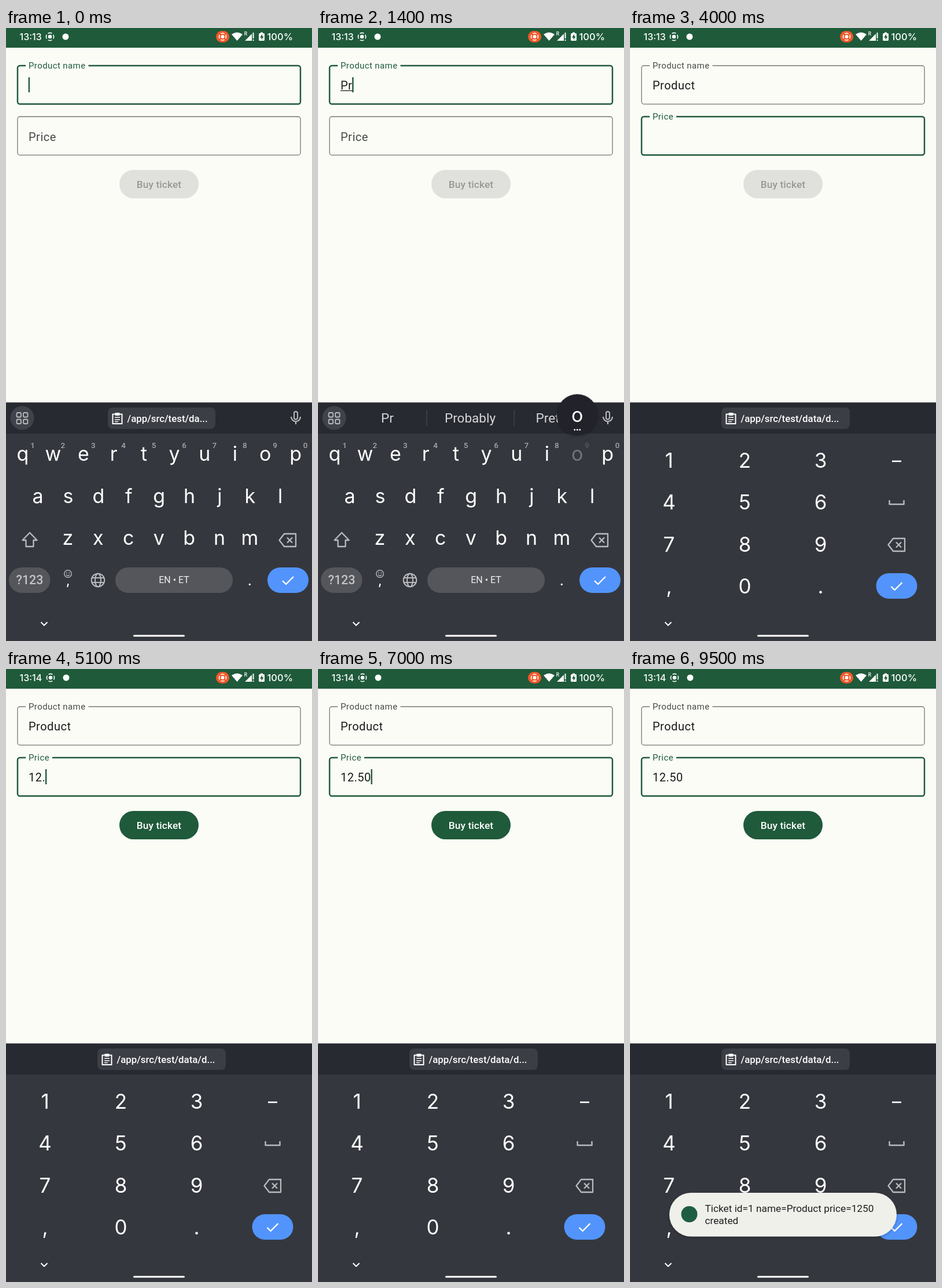
Recreate the animation shown at these times as an HTML page. Size 529 px wide and 1058 px high, loop 10000 ms.

```html
<!DOCTYPE html>
<html>
<head>
<meta charset="utf-8">
<style>
html, body { margin: 0; height: 100%; overflow: hidden; background: #fcfcf7; }
svg { display: block; width: 100vw; height: 100vh; font-family: Roboto, sans-serif; }
text { white-space: pre; }
</style>
</head>
<body>
<svg id="stage" viewBox="0 0 529 1058"></svg>
<script>
const LOOP = 10000, STEP = 100;
const GREEN = '#1f5a3b', PAPER = '#fcfcf7', PANEL = '#35373e', BAR = '#282a31';
const PILL = '#54565b', GREY = '#b9bbbf', BLUE = '#5294fb';
const KEY_FONT = 'font-family="Inter, sans-serif"';

// Timelines: [start, value] or [start, end, value]
const nameSteps = [[0, ''], [800, 'P'], [1200, 'Pr'], [1500, 'Pro'], [2300, 'Product ']];
const priceSteps = [[0, ''], [4500, '1'], [4700, '12'], [5100, '12.'], [5400, '12.5'], [6000, '12.50']];
const hintSteps = [[0, null], [800, ['P', 'Please', 'Pretty']], [1200, ['Pr', 'Probably', 'Pretty']],
  [1500, ['Pro', 'Product', 'Probably']], [2300, ['is', 'of', 'and']]];
const caretOff = [[500, 800], [2100, 2300], [2800, 3300], [4000, 4500], [5900, 6000],
  [6500, 7000], [7500, 8000], [8500, 9000], [9500, LOOP]];
const presses = [[700, 900, 'p'], [1000, 1200, 'r'], [1400, 1600, 'o'], [2100, 2300, 'hint'],
  [3300, 3500, 'enter'], [4400, 4500, '1'], [4600, 4700, '2'], [5000, 5100, '.'],
  [5200, 5400, '5'], [5900, 6000, '0']];

const within = (t, [a, b]) => t >= a && t < b;
const valueAt = (steps, t) => steps.filter(s => s[0] <= t).pop()[1];
const ramp = (t, a, b) => Math.min(1, Math.max(0, (t - a) / (b - a)));
const easeOut = p => 1 - (1 - p) ** 3;

const pen = document.createElement('canvas').getContext('2d');
const textWidth = (s, size, gap) => {
  pen.font = `${size}px Roboto, sans-serif`;
  return pen.measureText(s).width + s.length * gap;
};

const rect = (x, y, w, h, r, fill, extra = '') =>
  `<rect x="${x}" y="${y}" width="${w}" height="${h}" rx="${r}" fill="${fill}" ${extra}/>`;
const disc = (x, y, r, fill, extra = '') => `<circle cx="${x}" cy="${y}" r="${r}" fill="${fill}" ${extra}/>`;
const shape = (d, fill) => `<path d="${d}" fill="${fill}"/>`;
const line = (d, color, w = 2) =>
  `<path d="${d}" fill="none" stroke="${color}" stroke-width="${w}" stroke-linejoin="round"/>`;
const label = (x, y, s, size, fill, extra = '') =>
  `<text x="${x}" y="${y}" font-size="${size}" fill="${fill}" ${extra}>${s}</text>`;
const mid = (x, y, s, size, fill, extra = '') => label(x, y, s, size, fill, 'text-anchor="middle" ' + extra);
const at = (x, y, content) => `<g transform="translate(${x} ${y})">${content}</g>`;

function statusBar(t) {
  const late = t >= 4400, dx = late ? 1 : 0;
  const bold = KEY_FONT + ' font-weight="500"';
  const target = r => disc(0, 0, r, 'none',
    'stroke="#fff" stroke-width="1.6" pathLength="4" stroke-dasharray=".7 .3" stroke-dashoffset=".35"')
    + disc(0, 0, r / 2, '#fff');
  return rect(0, 0, 529, 34, 0, GREEN)
    + label(23.5, 20.5, late ? '13:14' : '13:13', 16, '#fff', bold)
    + at(76 + dx, 15, target(6.6))
    + disc(103 + dx, 15, 5.5, '#fff')
    + rect(363, 5, 23, 20, 10, '#f0592b')
    + at(374.5, 15, target(6))
    + shape('M390 11Q399.5 4 409 11L399.5 22Z', '#fff')
    + mid(414.5, 13, 'R', 8.5, '#fff', 'font-weight="500"')
    + shape('M413 22L425 10V22ZM426.5 8H428.5V18H426.5ZM426.5 20H428.5V22H426.5Z', '#fff')
    + rect(437, 9, 10, 13, 1.5, '#fff') + rect(440, 7.5, 4, 2, 0, '#fff')
    + shape('M443 10.5L439 16.5H441.5V20.5L445.5 14.5H443Z', GREEN)
    + label(451.5, 20.5, '100%', 16.5, '#fff', bold);
}

// lift: 0 = label rests inside the box, 1 = label sits on the border
function field(y, title, value, focused, lift, caret, composing) {
  const end = 39 + textWidth(value, 20, .5);
  let s = rect(20, y, 489, 66.3, 4, 'none',
    focused ? `stroke="${GREEN}" stroke-width="2.5"` : 'stroke="#74796f" stroke-width="1.3"');
  if (lift > 0) s += rect(34, y - 3, (textWidth(title, 15, .4) + 10) * lift, 6, 0, PAPER);
  s += label(39, y + 41.5 - 36.5 * lift, title, 20 - 5 * lift, focused ? GREEN : '#454b46',
    `letter-spacing="${.5 - .1 * lift}"`);
  s += label(39, y + 41, value, 20, '#1a1c1a', 'letter-spacing=".5"');
  if (composing) s += rect(39, y + 42.5, end - 39, 1.3, 0, '#1a1c1a');
  if (caret) s += rect(end - .3, y + 20, 2.4, 26, 0, GREEN);
  return s;
}

function form(t) {
  const onPrice = t >= 3500, caret = !caretOff.some(r => within(t, r));
  const name = valueAt(nameSteps, t), price = valueAt(priceSteps, t);
  const ripple = ramp(t, 7900, 8200), fade = 1 - ramp(t, 8200, 8500);
  let s = field(65, 'Product name', name, !onPrice, 1, caret && !onPrice, name && t < 2300)
    + field(153, 'Price', price, onPrice, easeOut(ramp(t, 3400, 3700)), caret && onPrice)
    + rect(196, 245, 137, 49, 24.5, price ? GREEN : '#e0e1dc');
  if (t >= 8000 && fade > 0)
    s += `<g clip-path="url(#button)">${disc(264, 269, 70 * ripple, '#fff', `opacity="${.16 * fade}"`)}</g>`;
  return s + mid(264.5, 276, 'Buy ticket', 17.3, price ? '#fff' : '#979994', 'font-weight="500" letter-spacing=".1"');
}

function chip(x, w, s) {
  return rect(x, 655, w, 37, 8, '#3c3e46')
    + at(x + 16.5, 674, line('M-8 -7.5H8V9H-8Z', '#fff') + rect(-4, -10, 8, 5, 1, '#fff')
      + line('M-4.5 -2H4.5M-4.5 2H4.5M-4.5 5.5H1.5', '#fff', 1.7))
    + label(x + 33.5, 679.5, s, 16.8, '#fff', 'font-weight="500"');
}

const enterKey = (x, y, pressed) => rect(x - 35.5, y - 22, 71, 44, 22, pressed ? '#86b4fc' : BLUE)
  + at(x, y, line('M-9.5 1L-3.5 7L9.5 -6', '#fff', 2.4));

const eraseKey = (x, y) => at(x, y, line('M-6 -11H14V11H-6L-14.5 0Z', GREY, 2.3)
  + line('M-1 -4.5L8 4.5M8 -4.5L-1 4.5', GREY, 2.3));

function hintBar(t, pressed) {
  let s = disc(28, 673, 20.5, '#41434a');
  for (const x of [18.5, 30]) for (const y of [664, 675.5])
    s += rect(x, y, 7.5, 7.5, 2, 'none', `stroke="${GREY}" stroke-width="1.8"`);
  const hints = valueAt(hintSteps, t);
  if (!hints) s += chip(176, 186, '/app/src/test/da...');
  else {
    if (pressed === 'hint') s += rect(190, 650, 147, 46, 8, '#3c3e46');
    s += [188, 339].map(x => rect(x - .5, 659, 1.3, 28, 0, '#44464d')).join('')
      + hints.map((h, i) => mid(120 + 143 * i, 681, h, 22.5, '#d5d6d9')).join('');
  }
  return s + at(501, 672, rect(-3, -10, 6, 13.5, 3, 'none', `stroke="${GREY}" stroke-width="2"`)
    + line('M-8 -1A8 8 0 0 0 8 -1M0 7V12', GREY, 2.2));
}

function letterKeys(t, pressed) {
  const caps = t >= 300 && t < 800;
  let s = hintBar(t, pressed), popup = '';
  [['qwertyuiop', 29, 747], ['asdfghjkl', 55, 820], ['zxcvbnm', 107, 892]].forEach(([row, x0, y], r) => {
    [...row].forEach((key, i) => {
      const x = x0 + 52.4 * i, glyph = caps ? key.toUpperCase() : key, down = key === pressed;
      const dim = down ? 'opacity=".3"' : '';
      s += mid(x, y, glyph, 34, '#fff', KEY_FONT + dim);
      if (!r) s += mid(x + 17, 725, (i + 1) % 10, 13.5, '#a5a7ab', 'font-weight="500" ' + dim);
      if (down) popup = disc(x, y - 79.5, 35.5, '#22242a', 'filter="url(#shadow)"')
        + mid(x, y - 67, glyph, 34, '#fff', KEY_FONT)
        + [-4.5, 0, 4.5].map(d => disc(x + d, y - 53.5, 1.4, '#fff')).join('');
    });
  });
  return s
    + at(41, 883, `<path d="M0 -12L12.5 1H6.5V12H-6.5V1H-12.5Z" fill="${caps ? GREY : 'none'}" stroke="${GREY}" stroke-width="2.3" stroke-linejoin="round"/>`)
    + eraseKey(487, 884)
    + rect(5, 931, 71.5, 44, 22, PILL) + mid(41, 960, '?123', 21.5, '#c2c4c7', 'font-weight="500"')
    + at(107, 942, disc(0, 0, 6.2, 'none', `stroke="${GREY}" stroke-width="1.4"`)
      + disc(-2.2, -1.6, 1, GREY) + disc(2.2, -1.6, 1, GREY) + line('M-3 1.5Q0 5 3 1.5', GREY, 1.3))
    + mid(107, 962, ',', 25, '#fff')
    + at(159, 953, disc(0, 0, 11.3, 'none', `stroke="${GREY}" stroke-width="2"`)
      + `<ellipse rx="5" ry="11.3" fill="none" stroke="${GREY}" stroke-width="2"/>` + line('M-10.5 -4H10.5M-10.5 4H10.5', GREY))
    + rect(189, 931, 203, 44, 22, PILL) + mid(290.5, 958, 'EN • ET', 16, '#f1f1f2')
    + mid(421.5, 962, '.', 30, '#fff')
    + enterKey(487.5, 953, pressed === 'enter') + popup;
}

function numberKeys(pressed) {
  let s = chip(158, 222, '/app/src/test/data/d...');
  [...'123456789,0.'].forEach((key, i) => {
    const x = 67.5 + 131 * (i % 3), y = 745.5 + 72.5 * (i / 3 | 0);
    if (key === pressed) s += rect(x - 65, y - 36, 130, 72, 36, '#54565d');
    s += mid(x, y + 13, key, 35, '#fff', KEY_FONT);
  });
  return s + rect(453, 746.5, 16, 2.6, 0, '#fff')
    + line('M448.5 815V822H473.5V815', GREY, 2.4)
    + eraseKey(461, 892) + enterKey(461, 963);
}

function toast(t) {
  const p = easeOut(ramp(t, 8300, 8800));
  if (!p) return '';
  return `<g opacity="${p}" transform="translate(264.5 942) scale(${.9 + .1 * p}) translate(-264.5 -942)">`
    + rect(68, 904, 393, 75.5, 37.7, '#f0f0eb', 'filter="url(#shadow)"')
    + disc(102.5, 941, 14, '#1f5d43')
    + label(129.5, 937, 'Ticket id=1 name=Product price=1250', 17.25, '#1d1f1d')
    + label(129.5, 958, 'created', 17.25, '#1d1f1d') + '</g>';
}

const defs = `<defs><clipPath id="button">${rect(196, 245, 137, 49, 24.5, '#000')}</clipPath>
  <filter id="shadow" x="-20%" y="-30%" width="140%" height="160%">
  <feDropShadow dx="0" dy="1.5" stdDeviation="2" flood-opacity=".3"/></filter></defs>`;

function scene(t) {
  const pressed = (presses.find(p => within(t, p)) || [])[2];
  return defs + rect(0, 0, 529, 1058, 0, PAPER) + statusBar(t) + form(t)
    + rect(0, 646.5, 529, 412, 0, PANEL) + rect(0, 646.5, 529, 53.5, 0, BAR)
    + (t < 3600 ? letterKeys(t, pressed) : numberKeys(pressed))
    + line('M60.5 1025.5L66 1031L71.5 1025.5', '#fff')
    + rect(220, 1047.5, 89, 3, 1.5, '#fff')
    + toast(t);
}

const stage = document.getElementById('stage');
const start = performance.now();
let shown = -1;
function tick() {
  const t = Math.floor((performance.now() - start) % LOOP / STEP) * STEP;
  if (t !== shown) stage.innerHTML = scene(shown = t);
  requestAnimationFrame(tick);
}
tick();
</script>
</body>
</html>
```
